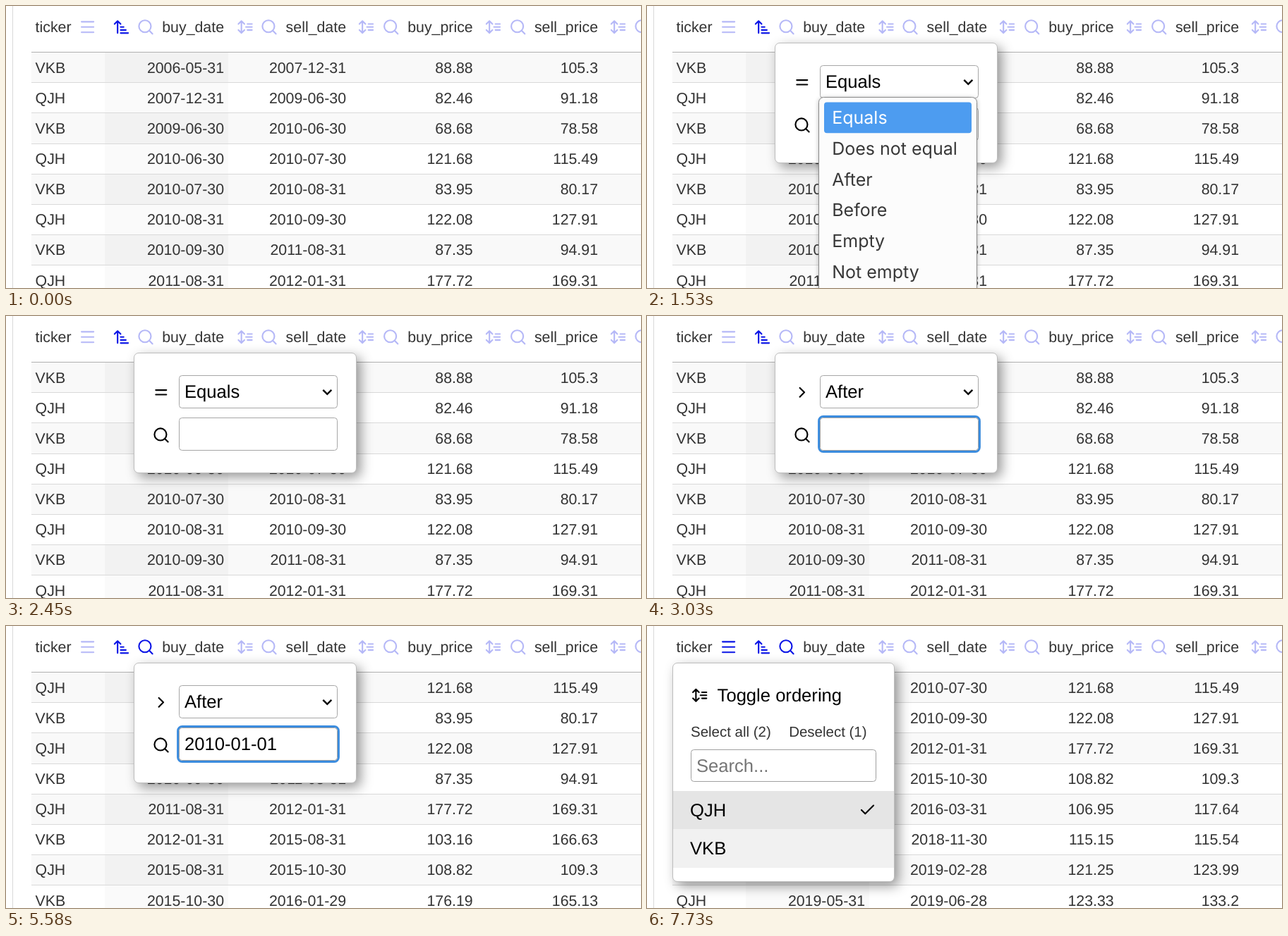
These frames come from a looping animation (900x400 px, 8 s). An HTML page with a canvas:

```html
<!DOCTYPE html>
<html lang="en">
<head>
<meta charset="utf-8">
<title>Table filters</title>
<style>
html, body { margin: 0; width: 100%; height: 100%; overflow: hidden; background: #fff; }
canvas { display: block; }
</style>
</head>
<body>
<canvas id="stage" width="900" height="400"></canvas>
<script>
const ctx = document.getElementById('stage').getContext('2d');
ctx.textRendering = 'geometricPrecision';

const LOOP = 8000;
const BLUE = '#0a14e6';
const SANS = '"Liberation Sans", Arial, sans-serif';
const MENU = 'Inter, "Open Sans", sans-serif';
const A = 'QJH', B = 'VKB';
const OPTIONS = ['Equals', 'Does not equal', 'After', 'Before', 'Empty', 'Not empty'];

// Each row: sell date, buy price, sell price. Every buy happens on the previous sell date.
const TRADES = `2007-12-31 88.88 105.3
2009-06-30 82.46 91.18
2010-06-30 68.68 78.58
2010-07-30 121.68 115.49
2010-08-31 83.95 80.17
2010-09-30 122.08 127.91
2011-08-31 87.35 94.91
2012-01-31 177.72 169.31
2015-08-31 103.16 166.63
2015-10-30 108.82 109.3
2016-01-29 176.19 165.13
2016-03-31 106.95 117.64
2018-10-31 180.53 241.6
2018-11-30 115.15 115.54
2018-12-31 246.3 223.4
2019-02-28 121.25 123.99
2019-05-31 249.8 247.1
2019-06-28 123.33 133.2`;

let prev = '2006-05-31';
const rows = TRADES.split('\n').map((line, i) => {
  const [sell, cost, price] = line.split(' ');
  const row = { ticker: i % 2 ? A : B, buy: prev, sell, cost, price };
  prev = sell;
  return row;
});

const COLUMNS = [['buy', 'buy_date', 309], ['sell', 'sell_date', 482],
  ['cost', 'buy_price', 661.7], ['price', 'sell_price', 839]];

const ICONS = Object.fromEntries(Object.entries({
  menu: 'M4 5h16M4 12h16M4 19h16',
  search: 'M19 11a8 8 0 1 1-16 0a8 8 0 1 1 16 0M21 21l-4.3-4.3',
  asc: 'M3 8l4-4 4 4M7 4v16M11 12h4M11 16h7M11 20h10',
  order: 'M3 8l4-4 4 4M11 16l-4 4-4-4M7 4v16M15 8h6M15 16h6M13 12h8',
  equal: 'M5 9h14M5 15h14',
  after: 'M9 18l6-6-6-6',
  check: 'M20 6L9 17l-5-5'
}).map(([name, d]) => [name, new Path2D(d)]));

function icon(name, x, y, color = '#000', alpha = 1) {
  ctx.save();
  ctx.translate(x, y);
  ctx.scale(1.067, 1.067);
  ctx.translate(-12, -12);
  ctx.globalAlpha = alpha;
  ctx.strokeStyle = color;
  ctx.lineWidth = 2;
  ctx.lineCap = ctx.lineJoin = 'round';
  ctx.stroke(ICONS[name]);
  ctx.restore();
}

function text(str, x, y, size = 21.33, color = '#333', align = 'left', family = SANS) {
  ctx.font = `${size}px ${family}`;
  ctx.fillStyle = color;
  ctx.textAlign = align;
  ctx.fillText(str, x, y);
}

function fill(x, y, w, h, color) {
  ctx.fillStyle = color;
  ctx.fillRect(x, y, w, h);
}

function box(x, y, w, h, r, bg, border, line = 1) {
  ctx.beginPath();
  ctx.roundRect(x, y, w, h, r);
  if (bg) {
    ctx.fillStyle = bg;
    ctx.fill();
  }
  ctx.shadowColor = 'transparent';
  if (border) {
    ctx.strokeStyle = border;
    ctx.lineWidth = line;
    ctx.stroke();
  }
}

function shadow(dx, dy, blur, alpha) {
  ctx.shadowOffsetX = dx;
  ctx.shadowOffsetY = dy;
  ctx.shadowBlur = blur;
  ctx.shadowColor = `rgba(0,0,0,${alpha})`;
}

// Latest value whose start time has passed; null before the first.
function step(t, ...keys) {
  let value = null;
  for (const [start, v] of keys) if (t >= start) value = v;
  return value;
}

const within = (t, a, b) => t >= a && t < b;
const rowTop = i => Math.floor(65.7 + 43.13 * i) + 1;

function headerButton(name, x, hover, active) {
  if (hover) box(x - 17.2, 12, 34.4, 35, 3.5, '#e6e6e6');
  icon(name, x, 29.8, BLUE, active ? 1 : hover ? 0.9 : 0.3);
}

function header(t) {
  text('ticker', 41.6, 37);
  headerButton('menu', 115.6, within(t, 5930, 6880), t >= 7730);
  headerButton('asc', 163.5, false, true);
  headerButton('search', 198, within(t, 430, 1130), t >= 4330);
  for (const x of [339, 510.5, 690.5, 867.5]) headerButton('order', x);
  for (const x of [373, 545.7, 725.7, 902]) headerButton('search', x);
  for (const [, label, right] of COLUMNS) text(label, right, 37, 21.33, '#333', 'right');
}

function table(t) {
  const shown = rows.filter(r => (t < 4330 || r.buy > '2010-01-01') && (t < 7730 || r.ticker === A)).slice(0, 8);
  const hover = step(t, [130, 0], [380, null], [2530, 4], [2680, 3], [2730, null],
    [5480, 2], [5530, 0], [5580, null]);
  shown.forEach((row, i) => {
    const y = rowTop(i), h = rowTop(i + 1) - y, odd = i % 2 === 0;
    const shade = hover === i ? [0.035, 0.082] : odd ? [0.023, 0.051] : [0, 0.019];
    fill(36, y, 104, h, `rgba(0,0,0,${shade[0]})`);
    fill(140, y, 175, h, `rgba(0,0,0,${shade[1]})`);
    fill(315, y, 585, h, `rgba(0,0,0,${shade[0]})`);
    if (i) fill(36, y - 1, 864, 1, '#d9d9d9');
    const base = Math.round(95 + 43.08 * i);
    text(row.ticker, 41.6, base);
    for (const [key, , right] of COLUMNS) text(row[key], right, base, 21.33, '#333', 'right');
  });
  fill(36, 65, 864, 1, '#b0b0b0');
}

function panel(x, y, w, h) {
  shadow(6, 6, 17, 0.42);
  box(x, y, w, h, 6.5, '#fff', '#bdbdbd');
}

function optionList(t) {
  const picked = step(t, [0, 0], [1850, 1], [1930, 2]);
  shadow(0, 1, 6, 0.3);
  box(243.5, 129.5, 224, 300, 7, '#fcfcfc', '#8a8a8a');
  OPTIONS.forEach((label, i) => {
    const on = i === picked, y = 43.8 * i;
    if (on) box(251, 136.4 + y, 209, 43.8, 4, '#4d9cf0');
    text(label, 262.2, 167 + y, 25, on ? '#fff' : '#383838', 'left', MENU);
  });
}

function datePanel(t) {
  const after = t >= 2500;
  panel(181.5, 52.5, 315, 170);
  icon(after ? 'after' : 'equal', 219.8, 108.3);
  icon('search', 220, 169);
  box(245.5, 84.5, 224, 46, 4, '#fff', '#a6a6a6');
  text(after ? 'After' : 'Equals', 253, 116, 25.6, '#000');
  ctx.beginPath();
  ctx.moveTo(449.3, 104.8);
  ctx.lineTo(455.3, 110.8);
  ctx.lineTo(461.3, 104.8);
  ctx.strokeStyle = '#000';
  ctx.lineWidth = 2.4;
  ctx.stroke();
  if (t >= 3030) box(243.7, 142.7, 227.6, 49.6, 6, '#fff', '#3b8cde', 3.2);
  box(245.5, 144.5, 224, 46, 4, '#fff', '#a6a6a6');
  if (t >= 4330) text('2010-01-01', 253, 176, 25.6, '#000');
  if (within(t, 1530, 2450)) optionList(t);
}

function tickerPanel(t) {
  const picked = t >= 7730;
  panel(36.5, 52.5, 314, 310);
  if (within(t, 6920, 6960)) fill(37, 71, 313, 54, '#f3f3f3');
  icon('order', 74.7, 98.3);
  text('Toggle ordering', 99.6, 107, 25.6, '#000');
  text('Select all (2)', 62, 157, 20.48, within(t, 7000, 7050) ? '#000' : '#333');
  if (picked) text('Deselect (1)', 201.2, 157, 20.48);
  else text('Deselect', 213.7, 157, 20.48);
  box(62.5, 175.5, 262, 45, 4, '#fff', '#a0a0a0');
  text('Search...', 70, 207, 25.6, '#757575');
  fill(37, 234, 313, 109, '#f1f1f1');
  if (t >= 7250) fill(37, 234, 313, 54, '#e5e5e5');
  text(A, 61, 270, 25.6, '#000');
  text(B, 61, 324, 25.6, '#000');
  if (picked) icon('check', 312.5, 261);
}

function draw(t) {
  fill(0, 0, 900, 400, '#fff');
  fill(9, 0, 1, 400, '#d9d9d9');
  table(t);
  header(t);
  if (within(t, 930, 6330)) datePanel(t);
  if (t >= 6430) tickerPanel(t);
}

const start = performance.now();
function tick() {
  draw((performance.now() - start) % LOOP);
  requestAnimationFrame(tick);
}
tick();
</script>
</body>
</html>
```
